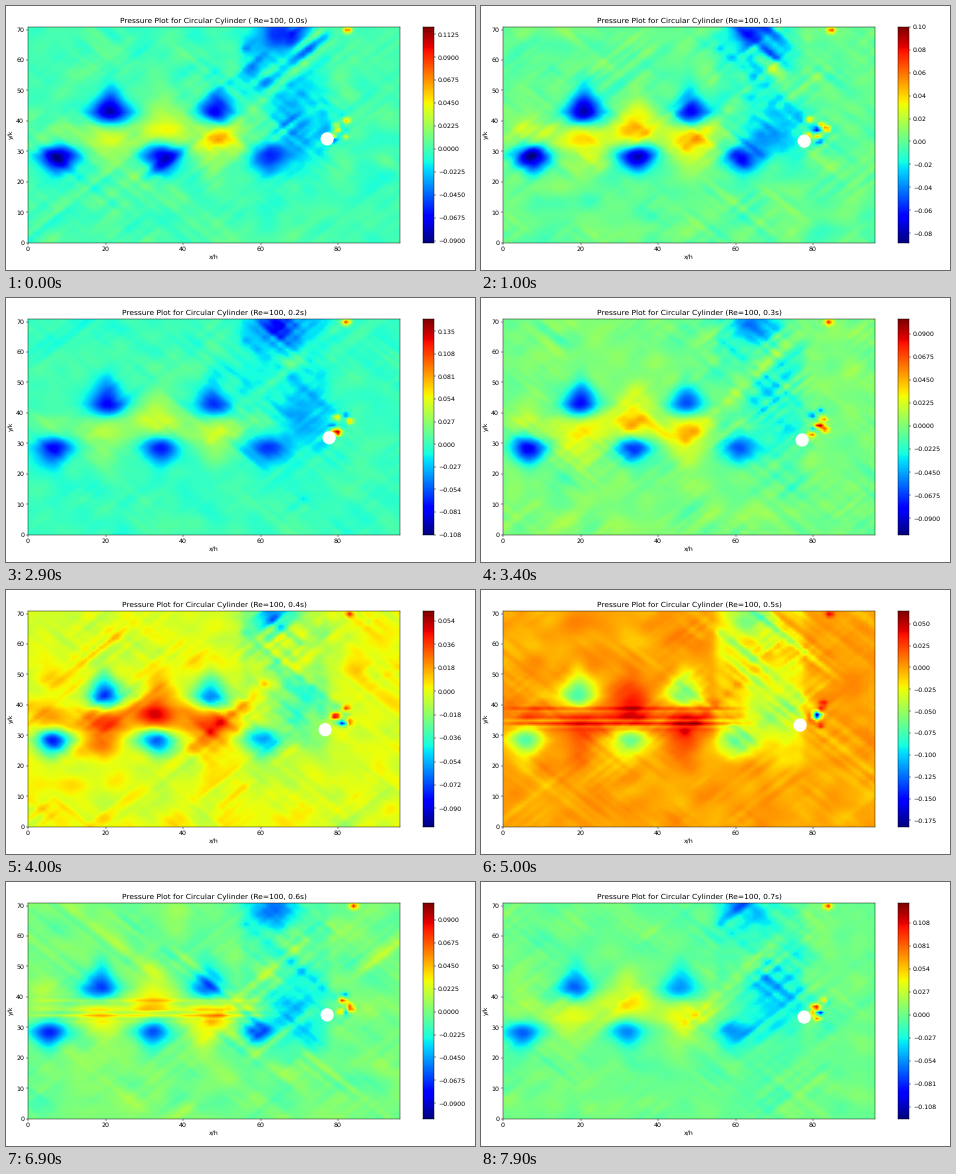
Write a matplotlib script that moves like this. It is 469 px wide and 264 px high and loops after 8 s.

```python
import math

import matplotlib.pyplot as plt
import numpy as np
from matplotlib.animation import FuncAnimation
from matplotlib.patches import Ellipse

W, H, DPI = 469, 264, 40
AX_W, AX_H = 372, 216
NX, NY = 96, 71
MID = 35.8  # centre line of the vortex street
X, Y = np.meshgrid(np.arange(NX + 1.0), np.arange(NY + 1.0))

# Lowest pressure, highest pressure and colour bar step of each snapshot
SCALES = [(-0.092, 0.120, 0.0225), (-0.088, 0.100, 0.02),
          (-0.108, 0.150, 0.027), (-0.106, 0.105, 0.0225),
          (-0.104, 0.062, 0.018), (-0.182, 0.065, 0.025),
          (-0.105, 0.107, 0.0225), (-0.122, 0.132, 0.027)]

plt.rcParams.update({"font.family": "DejaVu Sans", "font.size": 11.2,
                     "text.hinting": "none", "axes.titlepad": 8})


def blob(x, y, sx, sy):
    return np.exp(-((X - x) / sx) ** 2 - ((Y - y) / sy) ** 2)


def wedge(x, side, offset, w, away, toward):
    """Shield shape beside the centre line, narrowing away from its core."""
    d = (Y - MID) * side - offset
    taper = np.clip(1 - 0.07 * np.abs(d), 0.4, 1)
    r = np.hypot((X - x) / (w * taper), d / np.where(d > 0, away, toward))
    return np.exp(-r ** 1.8)


def streak(x0, y0, x1, y1, width):
    """Beaded line between two points."""
    length = math.hypot(x1 - x0, y1 - y0)
    ux, uy = (x1 - x0) / length, (y1 - y0) / length
    along = (X - x0) * ux + (Y - y0) * uy
    t = np.clip(along, 0, length)
    d2 = (X - x0 - t * ux) ** 2 + (Y - y0 - t * uy) ** 2
    return (0.8 + 0.3 * np.cos(1.5 * along)) * np.exp(-d2 / width ** 2)


def step(v, edge, soft):
    return 1 / (1 + np.exp(-np.clip((v - edge) / soft, -40, 40)))


def box(x0, x1, y0, y1, soft_x, soft_y):
    return ((step(X, x0, soft_x) - step(X, x1, soft_x))
            * (step(Y, y0, soft_y) - step(Y, y1, soft_y)))


def noise(rng, shape, n):
    """Unit-variance noise smoothed over n cells."""
    a = rng.normal(size=shape)
    kernel = np.hanning(n + 2)
    for axis in range(a.ndim):
        a = np.apply_along_axis(np.convolve, axis, a, kernel, "same")
    return a / a.std()


def texture(rng):
    """Mottling and criss-cross diagonals, strongest in the near wake."""
    i, j = X.astype(int), Y.astype(int)
    near = np.exp(-((X - 67) / 13) ** 2) * step(Y, 26, 3)
    diag = 0
    for cells in (i + j, i - j + NY):
        fade = np.clip(0.5 + 0.6 * noise(rng, X.shape, 17), 0, 1.4)
        diag = diag + noise(rng, NX + NY + 1, 3)[cells] * fade
    return (0.003 * noise(rng, X.shape, 9)
            + 0.003 * near * noise(rng, X.shape, 3)
            + diag * (0.0028 + 0.005 * near))


def street(k):
    """Lows alternate across the centre line, each facing a high."""
    p = 0
    for n in range(5):
        x, side = 7.8 + 13.6 * n - 0.4 * k, 1 if n % 2 else -1
        low = (-0.09 + 0.003 * k) * (1 - 0.025 * n * n)
        high = 0.034 * math.sin(math.pi * (n + 0.4) / 5)
        p = p + low * wedge(x, side, 7.2, 5, 6.2 + side, 3.6)
        p = p + high * (wedge(x, -side, 4, 7, 9, 5)
                        + 0.5 * blob(x, MID, 6, 2.8))
    return p


def snapshot(k):
    lo, hi, tick = SCALES[k]
    rng = np.random.default_rng(40 + k)
    p = texture(rng) + street(k)
    p += 0.008 * box(2, 60, 32, 39, 2, 0.2)
    p += 0.1 * lo * box(55, 77.5, 24, NY + 5, 0.5, 4)
    p -= 0.022 * blob(69, 37, 8, 10) + 0.05 * blob(65 - 0.4 * k, 69, 6, 6)
    p += 0.016 * streak(47, 31, 71, 59, 1.4)
    p -= 0.016 * streak(56, 64, 82, 37, 1.2)

    # The centre line breaks into stripes late in the run
    gain = 0.025 * math.exp(-((k - 5.4) / 0.7) ** 2)
    p += (gain * np.cos(2 * np.pi * (Y - 34) / 2.4)
          * box(2, 60, 32.5, 39.5, 2, 0.2))

    # Hot and cold specks behind the cylinder and at the top wall
    for n in range(8):
        amp = 0.5 * lo if n % 3 == 0 else 0.7 * hi
        p += amp * blob(rng.uniform(78.5, 84), rng.uniform(33, 41), 0.9, 0.9)
    p += 0.8 * hi * blob(rng.uniform(82, 85), NY - 1, 1, 1)

    vals = [n * tick for n in range(math.ceil(lo / tick - 0.01),
                                    math.floor(hi / tick + 0.01) + 1)]
    digits = len(f"{tick:g}") - 2
    phase = math.pi * k / 3
    return dict(
        p=np.clip(p, lo, hi), clim=(lo, hi),
        centre=(77.2 + 0.6 * math.sin(phase), 32.6 + 1.5 * math.cos(phase)),
        ticks=[(v - lo) / (hi - lo) for v in vals],
        labels=[f"{v:.{digits}f}".replace("-", "\u2212") for v in vals],
        title="Pressure Plot for Circular Cylinder "
              f"({'' if k else ' '}Re=100, 0.{k}s)")


def rect(x, y, w, h):
    return [x / W, 1 - (y + h) / H, w / W, h / H]


shots = [snapshot(k) for k in range(len(SCALES))]

fig = plt.figure(figsize=(W / DPI, H / DPI), dpi=DPI, facecolor="white")
ax = fig.add_axes(rect(22, 20.6, AX_W, AX_H))
cax = fig.add_axes(rect(417.25, 20.6, 10.8, AX_H))

field = ax.imshow(shots[0]["p"], cmap="jet", origin="lower", aspect="auto",
                  interpolation="bilinear",
                  extent=(-0.5, NX + 0.5, -0.5, NY + 0.5))
ax.set(xlim=(0, NX), ylim=(0, NY), xlabel="x/h", ylabel="y/k",
       xticks=range(0, 81, 20), yticks=range(0, 71, 10))
title = ax.set_title("")
cylinder = ax.add_patch(Ellipse((0, 0), 13.2 * NX / AX_W, 13.2 * NY / AX_H,
                                fc="white", ec="none"))

cax.imshow(np.linspace(0, 1, 256)[:, None], cmap="jet", origin="lower",
           aspect="auto", extent=(0, 1, 0, 1))
cax.set_xticks([])
cax.yaxis.tick_right()


def draw(i):
    s = shots[i // 10]
    field.set_data(s["p"])
    field.set_clim(*s["clim"])
    title.set_text(s["title"])
    cylinder.set_center(s["centre"])
    cax.set_yticks(s["ticks"], s["labels"])
    cax.set_ylim(0, 1)
    return field, title, cylinder


anim = FuncAnimation(fig, draw, frames=80, interval=100, repeat=True,
                     repeat_delay=0, blit=False)
plt.show()
```
